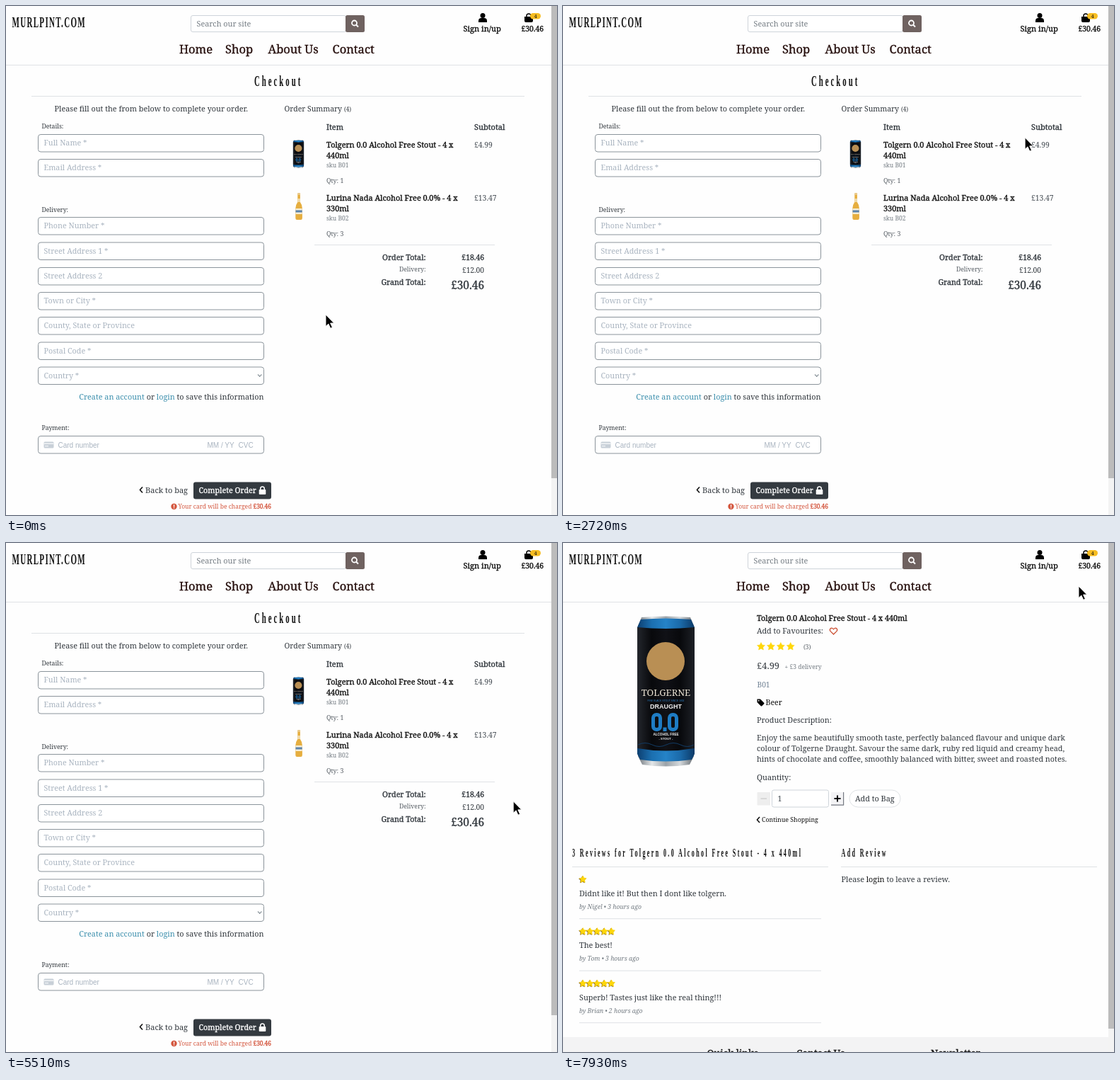
An HTML page for the animation above (8000 ms loop, 779 px wide and 719 px high).

```html
<!DOCTYPE html>
<html lang="en">
<head>
<meta charset="utf-8">
<title>Checkout</title>
<style>
html, body { margin: 0; width: 100%; height: 100%; overflow: hidden; background: #fefefe; }
svg { display: block; width: 100%; height: 100%; }
text { fill: currentColor; font-family: "Noto Serif", serif; white-space: pre; }
.med { stroke: currentColor; stroke-width: .34px; }
.it { font-style: italic; }
.sans { font-family: "Liberation Sans", Arial, sans-serif; }
.bold { font-weight: 700; }
.mid { text-anchor: middle; }
.end { text-anchor: end; }
.cond { font-family: "Liberation Serif", serif; font-weight: 700; }
.hover { text-decoration: underline; }
</style>
</head>
<body>
<svg id="stage" viewBox="0 0 779 719" xmlns="http://www.w3.org/2000/svg"></svg>
<script>
const INK = '#30363c', BLACK = '#111', GREY = '#737b82', HINT = '#a9b4c0', LINE = '#dfe2e5', BLUE = '#3c8fad';
const BRAND = 'MURLPINT.COM';
const STOUT = 'Tolgern 0.0 Alcohol Free Stout - 4 x';
const LAGER = 'Lurina Nada Alcohol Free 0.0% - 4 x';

const text = (x, y, s, size = 10.82, color = INK, cls = '') =>
  `<text x="${x}" y="${y}" font-size="${size}" color="${color}" class="${cls}">${s}</text>`;
const cond = (x, y, s, size, gap) =>
  `<text transform="translate(${x} ${y}) scale(.5 1)" font-size="${size}" letter-spacing="${gap}em" color="${BLACK}" class="cond">${s}</text>`;
const rect = (x, y, w, h, fill, r = 0, stroke = 'none') =>
  `<rect x="${x}" y="${y}" width="${w}" height="${h}" rx="${r}" fill="${fill}" stroke="${stroke}"/>`;
const rule = (x1, x2, y) => rect(x1, y, x2 - x1, 1, LINE);
const path = (d, fill, stroke = 'none', w = 1) =>
  `<path d="${d}" fill="${fill}" stroke="${stroke}" stroke-width="${w}" stroke-linejoin="round"/>`;
const dot = (x, y, r, fill) => `<circle cx="${x}" cy="${y}" r="${r}" fill="${fill}"/>`;
const group = (id, body) => `<g id="${id}">${body}</g>`;
const shade = (id, ...colors) => `<linearGradient id="${id}">${colors.map((c, i) =>
  `<stop offset="${i / (colors.length - 1)}" stop-color="${c}"/>`).join('')}</linearGradient>`;

function star(x, y, r, fill = '#ffd70a') {
  let d = '';
  for (let i = 0; i < 10; i++) {
    const a = i * Math.PI / 5, q = i % 2 ? r * .5 : r;
    d += `${i ? 'L' : 'M'}${(x + q * Math.sin(a)).toFixed(2)} ${(y - q * Math.cos(a)).toFixed(2)}`;
  }
  return path(d + 'Z', fill, fill, .5);
}
const stars = (n, x, y, step, r, shadow) => Array.from({ length: n }, (_, i) =>
  (shadow ? star(x + i * step - .8, y + .6, r, shadow) : '') + star(x + i * step, y, r)).join('');
const chevron = (x, y) => path(`M${x + 4} ${y - 4}l-3.6 4l3.6 4`, 'none', BLACK, 1.6);

const zero = x => `<rect x="${x}" y="139.5" width="10" height="21" rx="4.6" fill="none" stroke="#1e7cc4" stroke-width="5"/>`;
const can = shade('blue', '#0d3f70', '#1b6fb0', '#2583c8', '#1b6aa9', '#0c3a68') +
  shade('dark', '#23262c', '#08090c', '#101116', '#08090c', '#1d2026') +
  shade('metal', '#6f767c', '#e3e6e8', '#9ba2a8', '#d5d9dc', '#666d73') + `<symbol id="can" viewBox="0 0 81 213">
  ${path('M6 2Q40 -1 75 2L80 14V198L74 210Q40 215 7 210L1 198V14Z', 'url(#metal)')}
  ${path('M5 5Q40 2 76 5L81 16V195L77 203Q40 208 4 203L0 195V16Z', 'url(#blue)')}
  ${path('M0 16Q40 20 81 16V187Q40 194 0 187Z', 'url(#dark)')}
  ${path('M1 182q10 -5 20 0t20 0t20 0t19 0', 'none', '#123b64', 1)}
  ${dot(40, 64, 27, '#b98f54')}
  ${text(40.5, 113, 'TOLGERNE', 13, '#ece4d4', 'mid')}
  ${text(40.5, 121, 'FINE BLACK STOUT SINCE 1802', 3.4, '#2b7dc0', 'mid sans')}
  ${text(40.5, 131, 'DRAUGHT', 9, '#eee', 'mid sans bold')}
  ${zero(22.5)}${zero(45.5)}${rect(36.5, 157.5, 5, 5.5, '#1e7cc4')}
  ${text(40.5, 169, 'ALCOHOL FREE', 4.6, '#eee', 'mid sans bold')}
  ${text(40.5, 175, '- STOUT -', 4.4, '#eee', 'mid sans bold')}
</symbol>`;
const putCan = (x, y, w, h) => `<use href="#can" x="${x}" y="${y}" width="${w}" height="${h}"/>`;

const bottle =
  path('M412.3 265h3.6v12q3 4 3 9v13.5q0 2.5-2 2.5h-5.6q-2 0-2-2.5v-13.5q0-5 3-9z', '#e6ae3f') +
  rect(412.1, 264, 4, 3, '#e9c98a', .8) + rect(412.4, 272, 3.4, 5, '#f0dcae') +
  rect(409.5, 286, 9.2, 8, '#f4ecd5') + rect(409.5, 288.5, 9.2, 3, '#5b83ad');

const header =
  cond(8.5, 30, BRAND, 22, .12) +
  [[245, 'Home'], [310, 'Shop'], [370.5, 'About Us'], [461.5, 'Contact']]
    .map(([x, s]) => text(x, 67, s, 16.5, '#260f0d', 'med')).join('') +
  text(646.5, 36, 'Sign in/up', 11.1, BLACK, 'med') +
  text(728.5, 36, '£30.46', 10.4, BLACK, 'med') + rule(0, 771, 83);

const searchBox = edge =>
  rect(261.5, 13.5, edge - 261, 23, '#fff', 2.5, '#ced4da') +
  rect(edge, 13, 507 - edge, 24, '#6f6260', 2.5) + text(269.5, 29, 'Search our site', 10.82, '#747c83');
const badge = x => rect(x, 10, 15, 8.5, '#f7bd22', 4.2) + text(x + 7.5, 17, '4', 7.5, BLACK, 'mid');

const headFull = searchBox(480) +
  `<circle cx="492.5" cy="24" r="3.5" fill="none" stroke="#fff" stroke-width="1.8"/>` +
  path('M495 26.5l3 3', 'none', '#fff', 2) +
  dot(674, 13.4, 3.5, '#000') + path('M668 23v-2q0-4 4-4h4q4 0 4 4v2z', '#000') +
  path('M733 15h12v6q0 2-2 2h-8q-2 0-2-2z', '#000') +
  path('M736 16v-2q0-3 3-3t3 3v2', 'none', '#000', 1.5) + badge(741);
const headBare = searchBox(490) + badge(734);

function checkout() {
  const field = (y, s) => rect(45.5, y + .5, 319, 24.5, '#fff', 3.5, '#8b949b') + (s ? text(53.5, y + 16.2, s, 10.75, HINT) : '');
  const item = (y, name, size, sku, qty, price, id) =>
    `<g id="${id}">${text(453, y, name, 10.9, BLACK, 'med')}${text(453, y + 15, size, 10.9, BLACK, 'med')}</g>` +
    text(453, y + 28, 'sku ' + sku, 8.5, GREY) + text(453, y + 50.5, 'Qty: ' + qty, 8.8, '#555c63') +
    text(662, y, price, 10.4, '#444b52');
  const fields = [[181, 'Full Name *'], [216, 'Email Address *'], [298, 'Phone Number *'], [333.5, 'Street Address 1 *'],
    [369, 'Street Address 2'], [404, 'Town or City *'], [439, 'County, State or Province'], [474.5, 'Postal Code *'],
    [509.5, 'Country *'], [607, '']];
  return cond(351, 113, 'Checkout', 21.5, .28) + rule(36, 733, 127) +
    text(68.5, 149, 'Please fill out the from below to complete your order.') +
    text(50.5, 172.5, 'Details:', 8.7) + text(50.5, 290.5, 'Delivery:', 8.7) + text(50.5, 599, 'Payment:', 8.7) +
    fields.map(f => field(...f)).join('') +
    path('M356 520.5l2.7 2.8l2.7-2.8', 'none', '#8b949b', 1.2) +
    text(364.5, 556, `<tspan fill="${BLUE}">Create an account</tspan> or <tspan fill="${BLUE}">login</tspan> to save this information`, 10.82, INK, 'end') +
    rect(53.5, 615.5, 14, 9, '#c8d0d8', 1.5) + rect(53.5, 617.5, 14, 1.5, '#f4f6f8') + rect(55, 621, 5, 1.2, '#f4f6f8') +
    text(73.5, 623.5, 'Card number', 10, HINT, 'sans') + text(284.5, 623.5, 'MM / YY', 10, HINT, 'sans') +
    text(328.5, 623.5, 'CVC', 10, HINT, 'sans') +
    chevron(189, 683.5) + text(197, 687.5, 'Back to bag', 11) +
    rect(265, 672.5, 110, 24, '#343a40', 3) + text(272.5, 688.2, 'Complete Order', 10.75, '#fff', 'med') +
    rect(357.7, 683, 9.6, 7, '#fff', 1) + path('M359.7 684v-2q0-3 2.8-3t2.8 3v2', 'none', '#fff', 1.5) +
    dot(237.5, 707, 4.2, '#d4573f') + rect(236.9, 704.3, 1.3, 3.4, '#fff') + rect(236.9, 708.5, 1.3, 1.3, '#fff') +
    text(243.5, 710.3, 'Your card will be charged', 8.5, '#d4573f') +
    text(375, 710.3, '£30.46', 8.4, '#d4573f', 'med end') +
    text(393.5, 149, 'Order Summary', 10.5) + text(478, 149, '(4)', 8) +
    text(453, 174.5, 'Item', 10.9, INK, 'med') + text(662, 174.5, 'Subtotal', 11, INK, 'med') +
    putCan(405, 189, 17, 40) + bottle +
    item(199.5, STOUT, '440ml', 'B01', 1, '£4.99', 'stout') +
    item(274.5, LAGER, '330ml', 'B02', 3, '£13.47', 'lager') + rule(436, 691, 337) +
    text(593.5, 359, 'Order Total:', 10.7, INK, 'med end') + text(676, 359, '£18.46', 10.4, INK, 'med end') +
    text(593.5, 375, 'Delivery:', 8.7, '#555c63', 'end') + text(676, 377, '£12.00', 10.2, INK, 'end') +
    text(593.5, 394, 'Grand Total:', 10.7, INK, 'med end') + text(676, 400, '£30.46', 15.4, INK, 'med end') +
    rect(771, 0, 8, 719, '#f3f3f3') + rect(771, 0, 8, 667, '#bcbcbc');
}

function footer(y) {
  const head = (x, s) => text(x, y + 27.5, s, 13.6, BLACK, 'med');
  return rect(0, y, 771, 719 - y + 60, '#f3f3f4') + cond(13.5, y + 40, BRAND, 27, .01) +
    text(13, y + 59.5, 'All the pleasure. None of the guilt.', 8.6, GREY) +
    head(203.5, 'Quick links') + head(330, 'Contact Us') + head(520, 'Newsletter') +
    text(203.5, y + 51.5, 'All Products') + text(203.5, y + 66.5, 'Beers') + text(330, y + 51.5, 'Address:') +
    ['Old Murls Lane,', 'Murlpint', 'Murlton'].map((s, i) => text(416, y + 49.5 + i * 12.2, s, 8.7)).join('') +
    text(520, y + 49.5, 'Sign up to our weekly newsletter to keep up to date with', 8.67, GREY) +
    text(520, y + 61.5, 'all our latest products and offers!', 8.67, GREY);
}

// full: icon glyphs have loaded, which pushes the layout down
function product(full) {
  const up = full ? 0 : 7.5, x = full ? 295.5 : 287;
  const reviews = [['Didnt like it! But then I dont like tolgern.', 'Nigel', 3, 1], ['The best!', 'Tom', 3, 5],
    ['Superb! Tastes just like the real thing!!!', 'Brian', 2, 5]];
  const start = full ? 498.5 : 476, step = full ? 73.5 : 58.5;
  let s = putCan(105, 103, 81, 213) +
    text(274, 109.5, STOUT + ' 440ml', 10.82, BLACK, 'med') +
    text(274, full ? 128 : 124.5, 'Add to Favourites:') +
    text(full ? 340 : 284, full ? 149.5 : 142.5, '(3)', 8.3, '#555c63') +
    text(274, 178 - up, '£4.99', 12.9) + text(313.5, 178 - up, '+ £3 delivery', 8.5, GREY) +
    text(274.5, 204 - up, 'B01', 10.2, '#738496') + text(full ? 286.5 : 277, 229 - up, 'Beer', 10.6, BLACK) +
    text(274, 254 - up, 'Product Description:') +
    ['Enjoy the same beautifully smooth taste, perfectly balanced flavour and unique dark',
      'colour of Tolgerne Draught. Savour the same dark, ruby red liquid and creamy head,',
      'hints of chocolate and coffee, smoothly balanced with bitter, sweet and roasted notes.']
      .map((l, i) => text(274, 279 + i * 15 - up, l)).join('') +
    text(274, 334.5 - up, 'Quantity:') +
    rect(x, 349 - up, 80, 24, '#fff', 2.5, '#ced4da') + text(x + 8, 365 - up, '1', 10.5, '#495057') +
    rect(x + (full ? 109.5 : 100.5), 349 - up, 72, 24, '#fff', 12, LINE) +
    text(x + (full ? 117.5 : 108.5), 365 - up, 'Add to Bag', 10.9) +
    text(full ? 281 : 274, 394.3 - up, 'Continue Shopping', 8.8, BLACK) +
    cond(13, 442.5 - up, `3 Reviews for ${STOUT} 440ml`, 16, .3) + rule(13, 375, 457 - up) +
    cond(393.5, 442.5 - up, 'Add Review', 16, .3) + rule(393, 755, 457 - up) +
    text(393.5, 478.5 - up, `Please <tspan fill="${BLACK}">login</tspan> to leave a review.`);
  reviews.forEach(([line, who, hours, n], i) => {
    const y = start + i * step;
    s += text(23, y, line) + text(23, y + 18, `by ${who} • ${hours} hours ago`, 8.7, GREY, 'it') + rule(23, 365, y + 31.7);
    if (full) s += stars(n, 28.2, y - 23.3, 10.1, 5.2, '#8a6a1f');
  });
  if (full) {
    s += path('M382.5 129l-4.4-4.4q-1.6-2 0-3.8q2-1.6 4.4 1q2.4-2.6 4.4-1q1.6 1.8 0 3.8z', 'none', '#c9492b', 1.2) +
      stars(4, 280, 146.3, 13.9, 5.8) +
      path('M274.5 220.5h4.5l5.2 5.2q.7.8 0 1.5l-3 3q-.8.7-1.5 0l-5.2-5.2z', '#000') + dot(276.7, 222.7, .9, '#fff') +
      rect(274.5, 352, 18.5, 18.5, '#eeeeee', 1) + rect(279.5, 360.2, 8.5, 1.8, '#d5d5d5') +
      rect(379, 352, 18, 18.5, '#f3f3f5', 1) + path('M379 370.2h17.6V352', 'none', '#757982', 1.2) +
      path('M383.5 361h9M388 356.5v9', 'none', '#000', 2) + chevron(274, 391);
  } else {
    s += rect(274.5, 355, 9.5, 3, '#ececec') + path('M370.5 357.7h9V355', 'none', '#70747c', 1.1);
  }
  return s + footer(full ? 698 : 645) + rect(771, 0, 8, 719, '#f3f3f3') + rect(771, 0, 8, full ? 686 : 719, '#bcbcbc');
}

const arrow = path('M0 0V16.5L3.9 13L6.7 19.3L9.4 18.1L6.6 12H11.7Z', '#000', '#fff', .9);
const hand = path('M-1.2 .8Q0-.5 1.2 .8V5.6Q2.5 4.8 3.3 6Q4.7 5.4 5.4 6.8Q7 6.4 7 8.2V11Q6.8 13 5.7 15H-.8Q-2.4 12-4.7 9.5Q-4.6 7.7-2.8 8.5L-1.2 10Z', '#fff', '#222', 1);

document.getElementById('stage').innerHTML = `<defs>${can}</defs>` + rect(0, 0, 779, 719, '#fefefe') + header +
  group('headFull', headFull) + group('headBare', headBare) + group('checkout', checkout()) +
  group('loading', product(false)) + group('loaded', product(true)) +
  group('cursor', group('arrow', arrow) + group('hand', hand));

// pointer stops: time, x, y
const way = [
  [70, 452, 436], [300, 470, 350], [560, 492, 250], [860, 495, 189], [920, 488, 178], [1060, 451, 161],
  [1130, 430, 147], [1200, 417, 172], [1330, 451, 229], [1550, 451, 229], [1950, 560, 249], [2320, 653, 257],
  [2390, 650, 254], [2540, 640, 222], [2720, 653, 186], [2820, 675, 173], [2930, 697, 195], [3030, 680, 245],
  [3130, 615, 269], [3350, 520, 275], [3600, 446, 312], [3750, 490, 336], [3950, 598, 325], [4030, 602, 320],
  [4300, 672, 249], [4430, 700, 283], [4570, 659, 320], [4830, 582, 320], [5000, 523, 360], [5150, 560, 404],
  [5300, 650, 412], [5480, 719, 375], [5650, 672, 313], [5780, 651, 300], [6050, 651, 300], [6390, 551, 247],
  [6550, 500, 225], [6680, 474, 209], [6800, 497, 198], [7540, 497, 198], [7720, 590, 146], [7930, 729, 61], [8000, 729, 61]
];
const same = (a, b) => a[1] === b[1] && a[2] === b[2];
function slope(i, k) {
  const a = way[i - 1], b = way[i], c = way[i + 1];
  if (!a || !c || same(a, b) || same(b, c)) return 0;
  return (c[k] - a[k]) / (c[0] - a[0]);
}
function pointer(t) {
  if (t <= way[0][0]) return way[0].slice(1);
  const i = Math.max(1, way.findIndex(p => p[0] >= t)), a = way[i - 1], b = way[i];
  const d = b[0] - a[0], u = (t - a[0]) / d, v = 1 - u;
  return [1, 2].map(k => v * v * (1 + 2 * u) * a[k] + u * u * (3 - 2 * u) * b[k] +
    d * u * v * (v * slope(i - 1, k) - u * slope(i, k)));
}

const parts = Object.fromEntries(['headFull', 'headBare', 'checkout', 'loading', 'loaded', 'cursor', 'arrow', 'hand', 'stout', 'lager']
  .map(id => [id, document.getElementById(id)]));
const show = (id, on) => { parts[id].style.display = on ? '' : 'none'; };

function draw(t) {
  const page = t < 6930 ? 'checkout' : t < 7260 ? 'loading' : 'loaded';
  ['checkout', 'loading', 'loaded'].forEach(id => show(id, id === page));
  show('headFull', page !== 'loading');
  show('headBare', page === 'loading');
  const [x, y] = pointer(t);
  const over = top => page === 'checkout' && x >= 453 && x <= 634 && y >= top && y <= top + 30;
  const onStout = over(188), onLager = over(264);
  parts.stout.setAttribute('class', onStout ? 'hover' : '');
  parts.lager.setAttribute('class', onLager ? 'hover' : '');
  const link = onStout || onLager || (page !== 'checkout' && t < 7590);
  show('hand', link);
  show('arrow', !link);
  parts.cursor.setAttribute('transform', `translate(${x.toFixed(2)} ${y.toFixed(2)})`);
}
function tick() {
  draw(performance.now() % 8000);
  requestAnimationFrame(tick);
}
tick();
</script>
</body>
</html>
```
